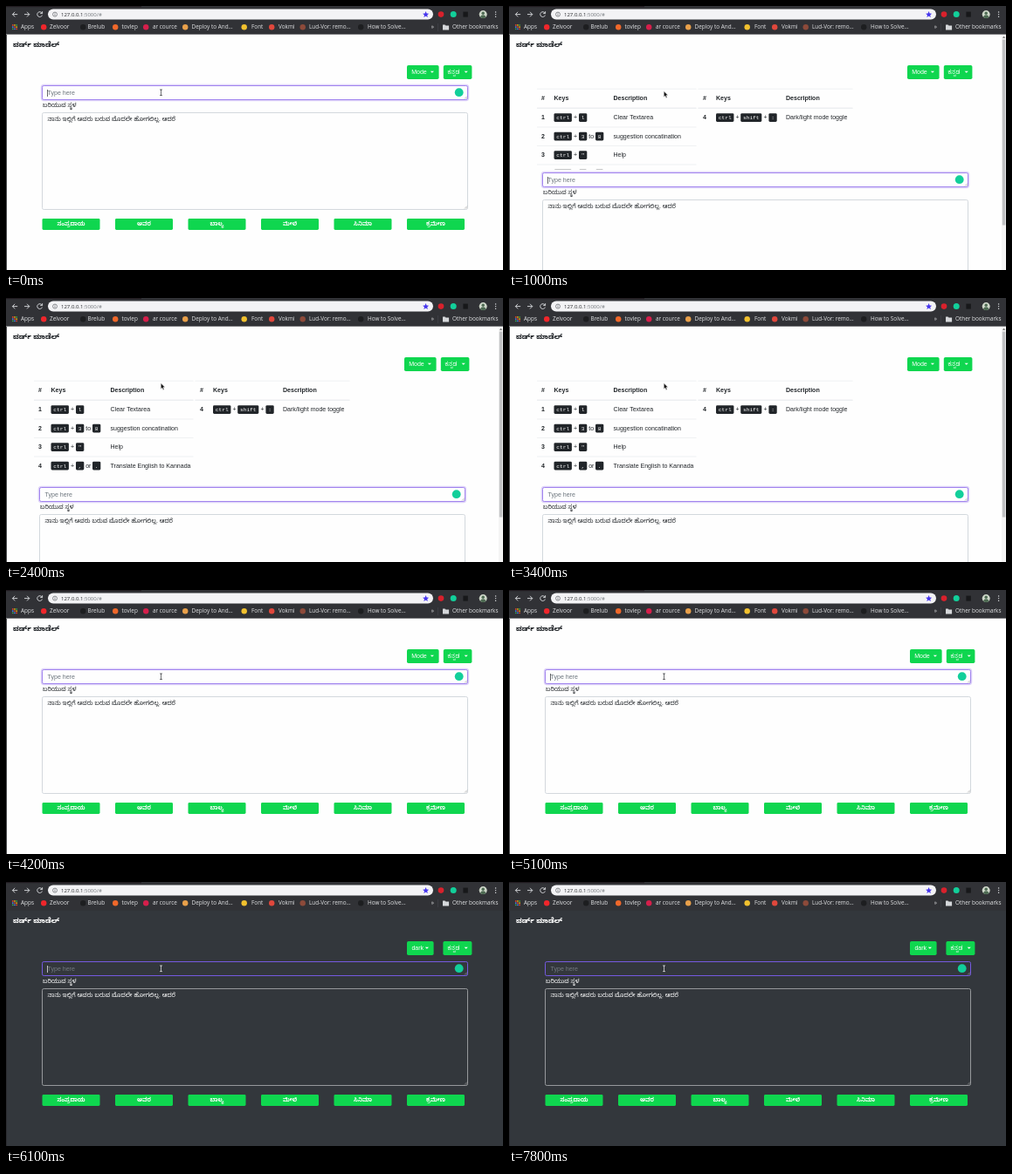
Recreate the animation shown at these times as an HTML page. Size 569x303 px, loop 8000 ms.

```html
<!DOCTYPE html>
<html lang="en">
<head>
<meta charset="utf-8">
<title>Word model</title>
<style>
html, body { margin: 0; width: 100%; height: 100%; overflow: hidden; }
svg { display: block; width: 569px; height: 303px; }
text { font: 7.04px "Liberation Sans", Arial, sans-serif; fill: var(--fg); white-space: pre; }
.ui text { font: 6.4px "Open Sans", "Noto Sans", sans-serif; fill: #e3e4e6; }
.ui .url { font-size: 6px; fill: #26282b; }
.kn { font-family: "Noto Sans Kannada", "Lohit Kannada", "Noto Sans", sans-serif; font-size: 6.76px; }
.brand { font-size: 7.9px; font-weight: bold; }
.b { font-weight: bold; }
.mid { text-anchor: middle; }
.btn rect { fill: #0fd64f; }
.btn text { fill: #fff; }
.btn .kn { font-size: 6.35px; }
.btn path { fill: #fff; }
.kbd rect { fill: #212529; }
.kbd text { font: 6.16px "Liberation Mono", monospace; fill: #fff; }
.rule { stroke: #dee2e6; stroke-width: .5; }
.bg { fill: var(--bg); }
.field { fill: var(--bg); stroke: var(--line); }
.focus { fill: var(--bg); stroke: var(--focus); }
.glow { fill: none; stroke: var(--glow); stroke-width: 2.6; }
.hint { fill: var(--hint); }
.grip { stroke: var(--grip); stroke-width: .5; }

/* One shared clock for every part */
.t { animation: 8s step-end -20ms infinite; }
#page { animation-name: theme; }
#lower { animation-name: slide; animation-timing-function: ease; }
.nudge { animation-name: nudge; }
.open { animation-name: open; }
#caret { animation-name: blink; }
#arrow { animation-name: arrow; }
#beam { animation-name: beam; }
#mode { animation-name: mode; }
#light { animation-name: light; }
#dark { animation-name: dark; }

@keyframes theme {
  0%, 76.24% { --bg: #fefefe; --fg: #212529; --line: #d3d8dd; --focus: #a184ee; --glow: #a88cf05c; --hint: #6c757d; --grip: #888; }
  76.25%, 100% { --bg: #33373c; --fg: #fff; --line: #97999c; --focus: #755ae0; --glow: #0000; --hint: #737980; --grip: #bbb; }
}
@keyframes slide {
  0%, 10.6% { transform: none; }
  15%, 43.4% { transform: translateY(126px); }
  47.8%, 100% { transform: none; }
}
@keyframes nudge { 0%, 46%, 100% { transform: none; } 11.5% { transform: translateX(-3px); } }
@keyframes open { 0%, 46%, 100% { opacity: 0; } 11.5% { opacity: 1; } }
@keyframes arrow { 0%, 47.8%, 100% { opacity: 0; } 12.5% { opacity: 1; } }
@keyframes beam { 0%, 47.8%, 100% { opacity: 1; } 12.5% { opacity: 0; } }
@keyframes blink {
  0%, 7.5%, 21.25%, 35%, 45%, 58.75%, 76.25%, 90% { opacity: 1; }
  1.25%, 15%, 28.75%, 41.25%, 52.5%, 67.5%, 82.5%, 97.5%, 100% { opacity: 0; }
}
@keyframes mode { 0% { opacity: 1; } 75%, 100% { opacity: 0; } }
@keyframes light { 0%, 76.25%, 100% { opacity: 0; } 75% { opacity: 1; } }
@keyframes dark { 0% { opacity: 0; } 76.25%, 100% { opacity: 1; } }
</style>
</head>
<body>
<svg viewBox="0 0 569 303">
  <g id="page" class="t">
    <rect class="bg" width="569" height="303"/>
    <text class="kn brand" x="8" y="46.9">ವರ್ಡ್ ಮಾಡೆಲ್</text>
    <g id="help"></g>
    <g id="lower" class="t">
      <rect class="bg" y="88" width="569" height="340"/>
      <g class="t nudge">
        <rect class="glow" x="41" y="91" width="488" height="17" rx="2.4"/>
        <rect class="focus" x="41.5" y="91.5" width="487" height="16" rx="1.8"/>
        <text class="hint" x="47.6" y="101.7">Type here</text>
        <rect id="caret" class="t" x="47.2" y="96" width=".7" height="8" fill="var(--fg)"/>
        <circle cx="518.7" cy="99.2" r="4.9" fill="#12cf9a"/>
        <path class="grip" d="M525 106.5l3-3m-1.3 3l1.3-1.3"/>
        <text class="kn" x="42" y="115.6">ಬರಿಯುವ ಸ್ಥಳ</text>
        <rect class="field" x="41.5" y="122.5" width="487" height="111" rx="1.8"/>
        <path class="grip" d="M525 232.5l3-3m-1.3 3l1.3-1.3"/>
        <text class="kn" x="47.6" y="132.2">ನಾನು ಇಲ್ಲಿಗೆ ಅವರು ಬರುವ ಮೊದಲೇ ಹೋಗಲಿಲ್ಲ. ಆದರೆ</text>
        <g id="words" class="btn"></g>
      </g>
    </g>
    <g class="btn t nudge">
      <g id="mode" class="t">
        <rect x="459" y="68" width="36.6" height="16" rx="1.8"/>
        <rect x="500.8" y="68" width="32.6" height="16" rx="1.8"/>
        <text x="464.2" y="78.3">Mode</text>
        <path d="M485.8 74.7h4.2l-2.1 2.1z"/>
      </g>
      <g id="light" class="t">
        <rect x="459" y="68" width="30.6" height="16" rx="1.8"/>
        <rect x="500.4" y="68" width="33" height="16" rx="1.8"/>
        <text x="464.6" y="78.3">light</text>
        <path d="M479.8 74.7h4.2l-2.1 2.1z"/>
      </g>
      <g id="dark" class="t">
        <rect x="459" y="68" width="30.6" height="16" rx="1.8"/>
        <rect x="500.4" y="68" width="33" height="16" rx="1.8"/>
        <text x="464.4" y="78.3">dark</text>
        <path d="M479.8 74.7h4.2l-2.1 2.1z"/>
      </g>
      <text class="kn" x="505.6" y="78">ಕನ್ನಡ</text>
      <path d="M524.6 74.7h4.2l-2.1 2.1z"/>
    </g>
    <g class="t open">
      <rect x="564" y="33" width="5" height="270" fill="#f4f4f4"/>
      <rect x="564.8" y="38.5" width="3.6" height="213" fill="#bfc0c2"/>
      <path d="M564.9 36.8h3.4l-1.7-2z" fill="#666"/>
    </g>
    <path id="beam" class="t" d="M176 96h3m-1.5 0v6.6m-1.5 0h3" fill="none" stroke="var(--fg)" stroke-width=".65"/>
    <path id="arrow" class="t" d="M177.3 97.8v6.6l1.5-1.4 1.1 2.4 1.1-.5-1.1-2.3h2.1z" fill="#111" stroke="#fff" stroke-width=".4"/>
    <rect y="33" width=".9" height="270" fill="#2a2b2e"/>
  </g>

  <g class="ui">
    <rect width="569" height="32.6" fill="#313236"/>
    <rect width="155" height="1.2" fill="#211b20"/>
    <g fill="none" stroke="#dcdee1" stroke-width=".9">
      <path d="M13.2 9.6H7.4m2.8-2.8L7.4 9.6l2.8 2.8"/>
      <path d="M21 9.6h5.8m-2.8-2.8l2.8 2.8-2.8 2.8"/>
      <path d="M41.2 8.2a2.9 2.9 0 1 0 .2 2.4M41.6 6.2v2.4h-2.4"/>
    </g>
    <rect x="48" y="3.6" width="441" height="12" rx="6" fill="#f3f3f5"/>
    <circle cx="56" cy="9.6" r="2.5" fill="none" stroke="#5f6368" stroke-width=".7"/>
    <path d="M56 9.2v1.8M56 7.9v.7" stroke="#5f6368" stroke-width=".7"/>
    <text class="url" x="63" y="11.7">127.0.0.1<tspan fill="#74787d">:5000/#</tspan></text>
    <path d="M480.6 6.1l1 2.4 2.5.2-1.9 1.7.6 2.5-2.2-1.4-2.2 1.4.6-2.5-1.9-1.7 2.5-.2z" fill="#4534ee"/>
    <circle cx="498" cy="9.6" r="3.3" fill="#d9212c"/>
    <circle cx="512.2" cy="9.6" r="3.5" fill="#12cf9a"/>
    <rect x="523.4" y="6.6" width="5.4" height="6" fill="#17181a"/>
    <circle cx="546.2" cy="9.6" r="4.5" fill="#cfd8ca"/>
    <path d="M543 12.8a3.3 3.3 0 0 1 6.4 0a4.5 4.5 0 0 1-6.4 0z" fill="#4d6a52"/>
    <circle cx="546.2" cy="8.2" r="1.7" fill="#4d6a52"/>
    <g fill="#dcdee1"><circle cx="560.6" cy="7" r=".7"/><circle cx="560.6" cy="9.6" r=".7"/><circle cx="560.6" cy="12.2" r=".7"/></g>
    <g id="marks"></g>
    <text x="486.8" y="26.1">»</text>
    <path d="M494.5 20v9" stroke="#4a4b50" stroke-width=".5"/>
    <path d="M500 21.6h2.6l.9 1h3.6v4.8H500z" fill="#d5d7da"/>
    <text x="511" y="26.3">Other bookmarks</text>
  </g>
</svg>
<script>
const $ = id => document.getElementById(id);
const label = (x, y, s, cls = '') => `<text class="${cls}" x="${x}" y="${y}">${s}</text>`;
const rule = (x1, x2, y) => `<path class="rule" d="M${x1} ${y}H${x2}"/>`;

function key(x, y, s) {
  const w = s.length * 3.7 + 5.6;
  return `<g class="kbd"><rect x="${x}" y="${y - 7}" width="${w}" height="9.8" rx="1.4"/>${label(x + 2.8, y, s)}</g>`;
}

function head(x1, x2, num, keys, desc) {
  return rule(x1, x2, 95.2) + rule(x1, x2, 117) + rule(x1, x2, 117.4) +
    label(num, 108.2, '#', 'b') + label(keys, 108.2, 'Keys', 'b') + label(desc, 108.2, 'Description', 'b');
}

const rows = [
  ['l', '', '', 'Clear Textarea'],
  ['3', 'to', '8', 'suggestion concatination'],
  ['"', '', '', 'Help'],
  [',', 'or', '.', 'Translate English to Kannada']
];
$('help').innerHTML = head(32, 214.5, 37, 51.5, 119.5) + head(216.5, 393.5, 222, 237, 317) +
  rows.map(([a, join, b, desc], i) => {
    const y = 130.2 + i * 21.5;
    return label(37, y, i + 1, 'b') + key(51.5, y, 'ctrl') + label(74, y, '+') + key(80, y, a) +
      (b ? label(91.2, y, join) + key(99, y, b) : '') + label(119.5, y, desc) +
      (i ? rule(32, 214.5, y - 12.7) : '');
  }).join('') +
  label(222, 130.2, 4, 'b') + key(237, 130.2, 'ctrl') + label(259.4, 130.2, '+') +
  key(265.2, 130.2, 'shift') + label(291.4, 130.2, '+') + key(297.4, 130.2, ':') +
  label(317, 130.2, 'Dark/light mode toggle');

$('words').innerHTML = ['ಸಂಪ್ರದಾಯ', 'ಅವರ', 'ಬಾಲ್ಯ', 'ಮೇಲೆ', 'ಸಿನಿಮಾ', 'ಕ್ರಮೇಣ'].map((s, i) => {
  const x = 41.5 + i * 83.5;
  return `<rect x="${x}" y="244" width="66" height="13" rx="1.4"/>` + label(x + 33, 251.5, s, 'kn b mid');
}).join('');

const marks = [
  [40, 50, '#f0262b', 'Zelvoor'], [85, 93.5, '#1d1e20', 'Brelub'], [122, 132.5, '#f0682a', 'tovlep'],
  [157, 168, '#d61f4b', 'ar cource'], [202, 212.5, '#e9a04a', 'Deploy to And...'], [269.5, 281, '#f2c12e', 'Font'],
  [301, 312, '#e0473c', 'Vokmi'], [336.5, 347, '#8d4a3a', 'Lud-Vor: remo...'], [403, 414, '#1d1e20', 'How to Solve...']
];
const tints = ['#ea4335', '#fbbc05', '#34a853', '#4285f4'];
let apps = label(17, 26.3, 'Apps');
for (let i = 0; i < 9; i++)
  apps += `<rect x="${7 + i % 3 * 2.2}" y="${21.2 + (i / 3 | 0) * 2.2}" width="1.5" height="1.5" fill="${tints[i % 4]}"/>`;
$('marks').innerHTML = apps + marks.map(([ix, x, color, s]) =>
  `<circle cx="${ix + 3.2}" cy="24.2" r="3.2" fill="${color}"/>` + label(x, 26.3, s)).join('');
</script>
</body>
</html>
```
